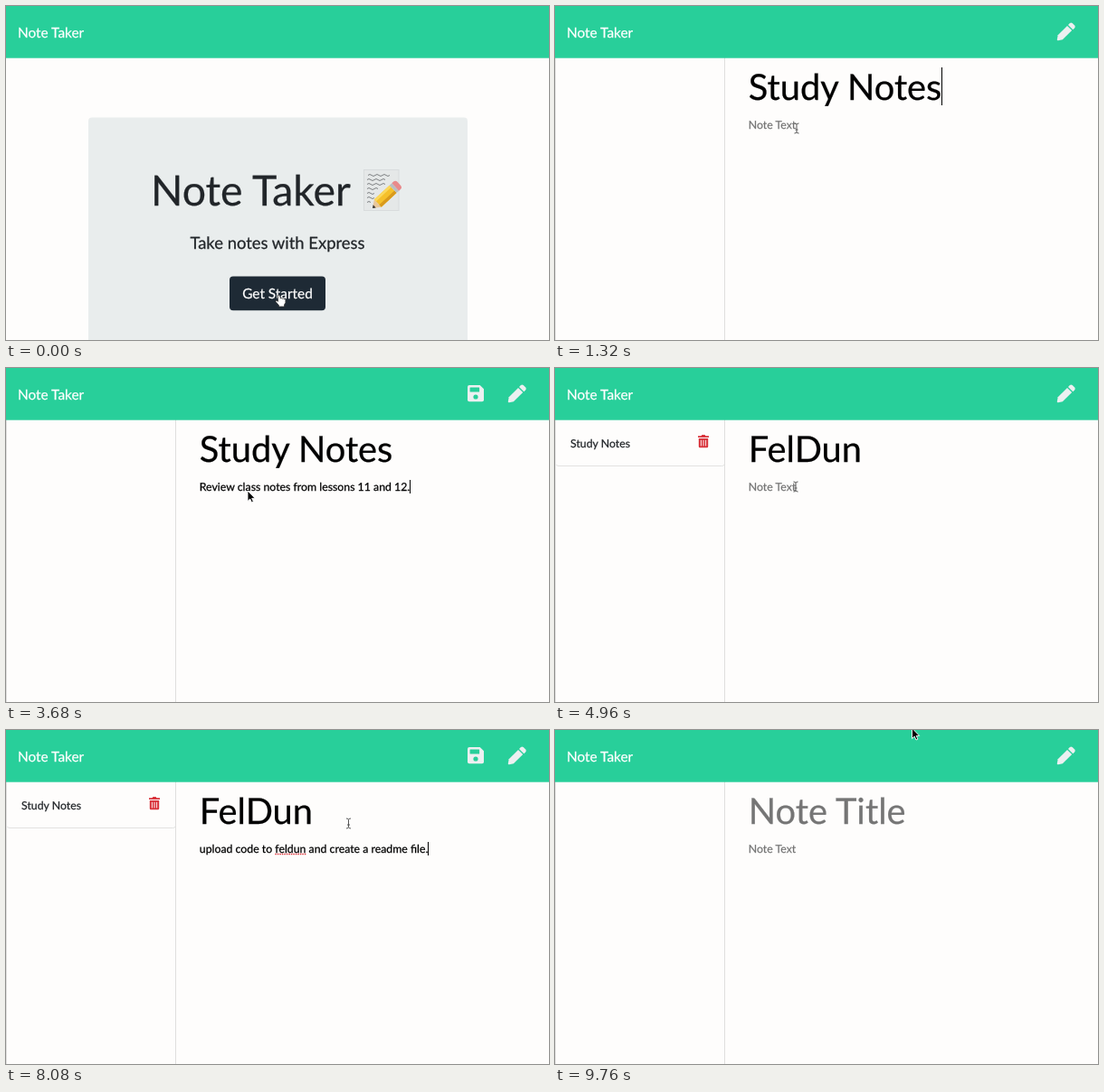
Animation of 600 by 370 pixels, one loop 9840 ms. Source, as an HTML page:

```html
<!DOCTYPE html>
<html lang="en">
<head>
<meta charset="utf-8">
<title>Note Taker</title>
<style>
  html, body { margin: 0; width: 100%; height: 100%; overflow: hidden; background: #fefdfc; }
  svg { display: block; width: 600px; height: 370px; }
  text {
    font-family: Lato, sans-serif; white-space: pre; text-rendering: geometricPrecision;
    color: #212529; fill: currentColor; stroke: currentColor; stroke-width: .25px;
  }
  .body { font-size: 12.3px; }
  .title { font-size: 39.8px; }
  .lead { font-size: 18.45px; }
  .nav { font-size: 15.4px; color: #fff; }
  .hero { font-size: 46.4px; }
</style>
</head>
<body>
<svg viewBox="0 0 600 370" xmlns="http://www.w3.org/2000/svg">
  <defs>
    <g id="trash" fill="#d9343c">
      <path d="M158 75.3h3.6l.8-1.3h3.2l.8 1.3h3.6v1.8h-12z"/>
      <path d="M158.8 78h10.4v9a1.3 1.3 0 0 1-1.3 1.3h-7.8a1.3 1.3 0 0 1-1.3-1.3z"/>
      <path d="M161.4 79.8v6.6M164 79.8v6.6M166.6 79.8v6.6" stroke="#fefdfc" stroke-width=".9"/>
    </g>
    <g id="card">
      <path d="M1.500 107q.5 1.500 2.500 1.500h180.500q2 0 2.500-1.500" fill="none" stroke="#e2e2e1"/>
      <use href="#trash"/>
    </g>
  </defs>
  <rect width="600" height="370" fill="#fefdfc"/>

  <g id="home">
    <rect x="91" y="123.500" width="419" height="260" rx="4" fill="#e9eded"/>
    <text class="hero" x="160" y="221">Note Taker</text>
    <g>
      <rect x="395" y="181" width="39.500" height="46" fill="#d8dcdd"/>
      <rect x="396" y="182" width="37.500" height="44" fill="#e5e8e8"/>
      <path d="M400 187.500q2-2 4 0t4 0 4 0 4 0 4 0 4 0M399 192.500q2-2 4 0t4 0 4 0 4 0 4 0M399 197.500q2-2 4 0t4 0 4 0 4 0 4 0M399 202.500q2-2 4 0t4 0 4 0M399 207.500q2-2 4 0t4 0M399 212.500q2-2 4 0t4 0M399 217.500q2-2 4 0"
        fill="none" stroke="#7d8083"/>
      <g transform="translate(405 224) rotate(-43) scale(1 1.150)">
        <path d="M0 0L8-5V5z" fill="#e8c79c"/>
        <path d="M0 0L3-1.900V1.900z" fill="#333"/>
        <path d="M8-5H31V5H8z" fill="#f5c02b"/>
        <path d="M8 2H31V5H8z" fill="#d99a1c"/>
        <path d="M8-5H31V-2.500H8z" fill="#fbd85b"/>
        <path d="M31-5h3.500V5H31z" fill="#b9bec2"/>
        <path d="M34.500-5H37q3 0 3 3v4q0 3-3 3h-2.500z" fill="#e88a8c"/>
      </g>
    </g>
    <text class="lead" x="300" y="268.500" text-anchor="middle">Take notes with Express</text>
    <rect x="247" y="299.500" width="106" height="37.700" rx="4" fill="#1e2a35"/>
    <text class="nav" x="300" y="324" text-anchor="middle">Get Started</text>
  </g>

  <g id="notes">
    <path d="M.5 57V370M187.500 57V370" stroke="#dfdfde"/>
    <g id="items">
      <g><use href="#card"/><text class="body" x="17" y="87.800"></text></g>
      <g transform="translate(0 51.500)"><use href="#card"/><text class="body" x="17" y="87.800"></text></g>
    </g>
    <text id="title" class="title" x="213.800" y="103.700"></text>
    <text id="text" class="body" x="213.800" y="135.700"></text>
    <path id="spell" stroke="#e0353c" stroke-width="1.300" stroke-dasharray="1.500 1"/>
    <rect id="caret" width="1"/>
  </g>

  <rect width="600" height="57.700" fill="#28cf9a"/>
  <text class="nav" x="12.900" y="34.500">Note Taker</text>
  <g id="pencil" fill="#ecf0f1">
    <path d="M566 21.900l5.200 5.200L560.800 37.300l-4.900.9q-1.200.1-1.100-1l.9-4.900z"/>
    <path d="M567 20.900l1.900-1.900q1.400-1.200 2.800 0l2.500 2.500q1.200 1.400 0 2.800l-1.900 1.900z"/>
  </g>
  <g id="save">
    <path d="M512 19h11.700L528 23.300V35.200a2 2 0 0 1-2 2H512a2 2 0 0 1-2-2V21a2 2 0 0 1 2-2z" fill="#ecf0f1"/>
    <rect x="512.600" y="21.600" width="10.500" height="5" rx=".5" fill="#28cf9a"/>
    <circle cx="519" cy="32" r="2.600" fill="#28cf9a"/>
  </g>

  <g id="cursor">
    <path id="arrow" d="M0 0V11.500L2.700 9.100L4.500 13L6.400 12.100L4.700 8.400H8.200z" fill="#000" stroke="#fff" stroke-width=".9"/>
    <path id="ibeam" d="M-2.500-5.500Q0-5.500 0-4V4Q0 5.500-2.500 5.500M2.500-5.500Q0-5.500 0-4M0 4Q0 5.500 2.500 5.500M-1.500 1.500H1.500" fill="none" stroke="#555" stroke-width="1"/>
    <path id="hand" d="M-1.600-4.500q1.300-1.200 2.100.5L1.600-1q1-.8 1.800.2 1.100-.7 1.800.4 1.400-.4 1.700 1V3.500L5.500 6V8H-.5V6.600L-4 2.600q-.5-1.500 1-1.400l1.500 1.100z" fill="#fff" stroke="#333" stroke-width=".8"/>
  </g>
</svg>
<script>
const LOOP = 9840, STEP = 40;
const $ = id => document.getElementById(id);
const ui = {};
for (const id of ['home', 'notes', 'items', 'title', 'text', 'spell', 'caret', 'pencil', 'save', 'cursor', 'arrow', 'ibeam', 'hand']) ui[id] = $(id);

const OPEN = 120, SAVE_1 = 3960, SAVE_2 = 8360, DELETE_1 = 8920, DELETE_2 = 9200;
const NOTES = [
  { title: 'Study Notes', text: 'Review class notes from lessons 11 and 12.' },
  { title: 'FelDun', text: 'upload code to feldun and create a readme file.', word: 'feldun' }
];

// [time, characters typed]
const TYPING = [
  { title: [[440, 0], [1200, 11]], text: [[1480, 0], [3480, 42]] },
  { title: [[4400, 0], [4720, 6]], text: [[5120, 0], [5640, 12], [5800, 12], [6840, 35], [7000, 35], [7640, 47]] }
];

// [time, x, y, pointer, linear move]
const MOUSE = [
  [0, 302, 325, 'hand'],
  [120, 302, 325, 'ibeam'],
  [400, 290, 98, 'ibeam'],
  [480, 290, 98, 'arrow'],
  [1200, 290, 98, 'ibeam'],
  [1320, 267, 135.5, 'ibeam'],
  [1520, 267, 136, 'arrow'],
  [3720, 267, 136, 'arrow'],
  [3920, 518, 27, 'hand'],
  [4000, 518, 27, 'arrow'],
  [4280, 300, 96, 'ibeam'],
  [4400, 300, 96, 'arrow'],
  [4760, 300, 96, 'ibeam'],
  [4960, 266, 131.5, 'ibeam'],
  [5160, 265.5, 132.5, 'arrow'],
  [7760, 265.5, 132.5, 'ibeam', true],
  [8080, 378.5, 103.5, 'ibeam', true],
  [8280, 518, 28, 'hand'],
  [8440, 518, 28, 'arrow'],
  [8800, 164, 82, 'hand'],
  [9320, 164, 82, 'arrow'],
  [9720, 394.5, -2, 'arrow'],
  [LOOP, 394.5, -2, 'arrow']
];

const show = (el, on) => el.setAttribute('visibility', on ? 'inherit' : 'hidden');
const set = (el, attrs) => { for (const k in attrs) el.setAttribute(k, attrs[k]); };

function typed(steps, t) {
  if (t < steps[0][0]) return 0;
  for (let i = 1; i < steps.length; i++) {
    const [t0, n0] = steps[i - 1], [t1, n1] = steps[i];
    if (t < t1) return Math.floor(n0 + (n1 - n0) * (t - t0) / (t1 - t0));
  }
  return steps[steps.length - 1][1];
}

function field(el, value, hint) {
  el.textContent = value || hint;
  el.style.color = value ? '#000' : '#757575';
  return 213.8 + (value ? el.getComputedTextLength() : 0);
}

function drawNote(t) {
  const k = t < SAVE_1 ? 0 : 1, note = NOTES[k], steps = TYPING[k];
  const done = t >= SAVE_2;
  const title = done ? '' : note.title.slice(0, typed(steps.title, t));
  const text = done ? '' : note.text.slice(0, typed(steps.text, t));
  const titleEnd = field(ui.title, title, 'Note Title');
  const textEnd = field(ui.text, text, 'Note Text');
  show(ui.save, title && text);

  const inText = t >= steps.text[0][0] - 80;
  const idle = done || t < 360 || (t >= SAVE_1 && t < 4320) || (t >= 4840 && t < 5120);
  show(ui.caret, !idle);
  set(ui.caret, inText
    ? { x: Math.round(textEnd - .3), y: 124, height: 15 }
    : { x: Math.round(titleEnd - .3), y: 68, height: 42 });

  const at = note.word ? note.text.indexOf(note.word) : -1;
  const marked = at >= 0 && text.length > at + note.word.length;
  show(ui.spell, marked);
  if (marked) {
    const x = 213.8 + ui.text.getSubStringLength(0, at);
    ui.spell.setAttribute('d', `M${x} 137.500h${ui.text.getSubStringLength(at, note.word.length)}`);
  }
}

function drawItems(t) {
  const list = [];
  if (t >= SAVE_1 && t < DELETE_1) list.push(NOTES[0].title);
  if (t >= SAVE_2 && t < DELETE_2) list.push(NOTES[1].title);
  [...ui.items.children].forEach((row, i) => {
    show(row, i < list.length);
    row.lastChild.textContent = list[i] || '';
  });
}

function drawMouse(t) {
  const i = MOUSE.findIndex(m => m[0] > t);
  const [t0, x0, y0, kind, linear] = MOUSE[i - 1], [t1, x1, y1] = MOUSE[i];
  const u = (t - t0) / (t1 - t0), s = linear ? u : u * u * (3 - 2 * u);
  ui.cursor.setAttribute('transform', `translate(${x0 + (x1 - x0) * s} ${y0 + (y1 - y0) * s})`);
  for (const name of ['arrow', 'ibeam', 'hand']) show(ui[name], name === kind);
}

function draw(t) {
  const open = t >= OPEN;
  show(ui.home, !open);
  show(ui.notes, open);
  show(ui.pencil, open);
  drawNote(t);
  if (!open) show(ui.caret, false);
  drawItems(t);
  drawMouse(t);
}

const start = performance.now();
function tick() {
  const t = (performance.now() - start) % LOOP;
  draw(Math.floor(t / STEP) * STEP);
  requestAnimationFrame(tick);
}
tick();
</script>
</body>
</html>
```
